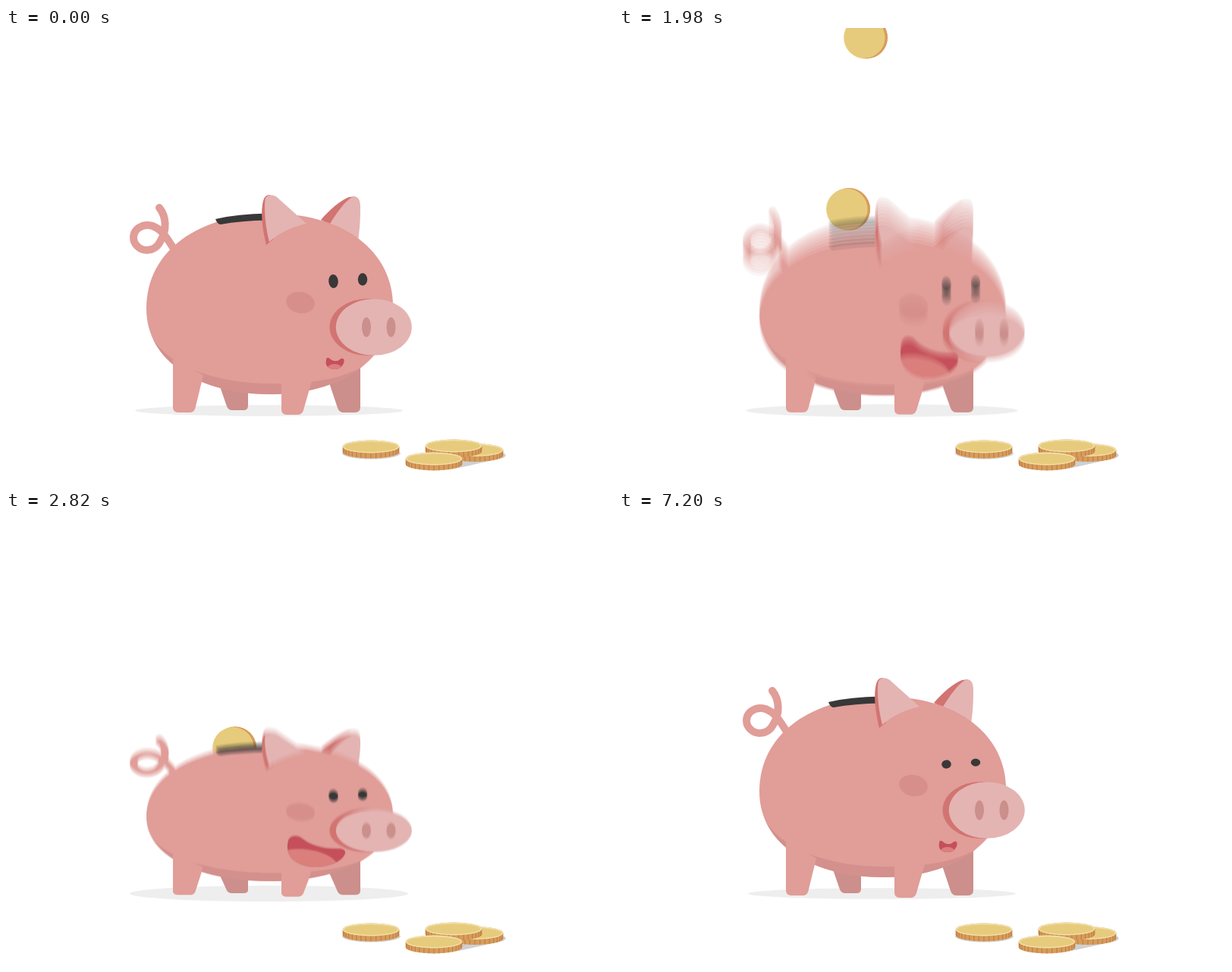
An HTML page with a canvas for the animation above (7230 ms loop, 800 by 600 pixels).

```html
<!DOCTYPE html>
<html lang="en">
<head>
<meta charset="utf-8">
<title>Piggy bank</title>
<style>
html, body { margin: 0; width: 100%; height: 100%; overflow: hidden; background: #fff; }
canvas { display: block; }
</style>
</head>
<body>
<canvas id="stage" width="800" height="600"></canvas>
<script>
const W = 800, H = 600, LOOP = 7230, STEP = 30, GROUND = 504;
const SHUTTER = 40, SAMPLES = 10;

const color = {
  skin: '#e19d98', shade: '#d3908c', farLeg: '#cc8f8b', pale: '#e4b4b2', deep: '#d27471',
  nostril: '#cb8f8c', cheek: '#d68f8b', ink: '#383838', mouth: '#c54f5a', tongue: '#db7f7d',
  gold: '#e7cb7c', rim: '#d89c5b', ridge: '#bf8044', glint: '#f3e2ae'
};

const body = new Path2D('M185 370C185 292 256 245 352 245C446 245 510 295 510 367C510 436 440 483 350 483C255 483 185 440 185 370Z');
const belly = new Path2D('M190 405C215 448 280 469 350 469C420 469 465 460 505 420V490H185Z');
const tail = new Path2D('M202 237C211 248 213 266 203 282C196 296 176 297 169 282C164 266 180 257 193 261C207 266 213 279 221 291');
const slot = new Path2D('M276 252Q305 245 345 244.500V253.500Q310 254 283 259Q279 259.500 276 252Z');
const nearLegs = [
  new Path2D('M220 435V500Q220 507 227 507H242Q248 507 249.500 501L260 458Z'),
  new Path2D('M363 462V503Q363 510 370 510H384Q390 510 392 504L404 462Z')
];
const farLegs = [
  new Path2D('M281 470L291 499Q293 504 298 504H313Q319 504 319 498V470Z'),
  new Path2D('M424 462L437 501Q439 507 445 507H460Q467 507 467 500V440Z')
];
const rearEar = {
  back: new Path2D('M415 253C428 238 440 228 452 223L460 222L432 262Z'),
  front: new Path2D('M427 258C435 245 446 229 456 223C463 220 467 226 467 236C467 255 466 267 464 280Z')
};
const frontEar = {
  back: new Path2D('M343 286C337 262 335 238 340 225C342 221 345 220 348 220L352 279Z'),
  front: new Path2D('M341.500 226C344 219 351 219 357 223L396 258C376 262 359 271 347 282C342 262 340 242 341.500 226Z')
};
// Start point followed by five cubic curves, matched so that one can turn into the other.
const smallMouth = [422, 438, 422, 434, 425, 434, 428, 437, 432, 440, 437, 440, 440, 437,
  444, 434, 447, 437, 445, 442, 443, 447, 439, 450, 433, 450, 426, 450, 420, 446, 422, 438];
const bigMouth = [372, 412, 374, 402, 385, 402, 390, 408, 402, 421, 420, 427, 436, 426,
  446, 425, 449, 431, 446, 437, 441, 450, 424, 458, 408, 458, 386, 458, 366, 442, 372, 412];

const squashKeys = [[0, 0], [700, 0], [930, .31], [1140, 0], [1490, 0], [1590, .3], [1690, 0],
  [1780, .3], [1930, 0], [1950, 0], [2050, .3], [2280, 0], [2430, 0], [2530, .3], [2640, 0],
  [2760, .28], [3030, 0], [LOOP, 0]];
const mouthKeys = [[0, 0], [1500, 0], [1680, 1], [3930, 1], [4110, 0], [LOOP, 0]];
const blinkStarts = [780, 4710, 6930];
const coinDrops = [[303, 1498], [327, 1684], [303, 1949], [326, 2452], [302, 2626]];
const sparkles = [[279.5, 165, 17, 15, '#cfcfcf'], [367, 221, 12, 0, '#efefef'], [346, 107, 8.5, 0, '#efc4b8']];

const mix = (a, b, u) => a + (b - a) * u;
const clamp = u => Math.max(0, Math.min(1, u));

function keyed(keys, t) {
  const i = keys.findIndex(k => k[0] > t);
  if (i < 1) return keys[0][1];
  const [t0, a] = keys[i - 1], [t1, b] = keys[i];
  return mix(a, b, (1 - Math.cos(Math.PI * (t - t0) / (t1 - t0))) / 2);
}

function eyeOpenness(t) {
  for (const start of blinkStarts) {
    const p = t - start + STEP;
    if (p > 0 && p < 330) return clamp(Math.max(1 - p / 130, (p - 200) / 160, .14));
  }
  return 1;
}

function layer() {
  const c = document.createElement('canvas');
  c.width = W; c.height = H;
  return c.getContext('2d');
}
const screen = document.getElementById('stage').getContext('2d');
const pig = layer(), scene = layer();

function fill(g, path, style) {
  g.fillStyle = style;
  g.fill(path);
}

function oval(g, x, y, rx, ry, style, turn = 0) {
  g.beginPath();
  g.ellipse(x, y, rx, ry, turn, 0, Math.PI * 2);
  g.fillStyle = style;
  g.fill();
}

function drawMouth(g, open) {
  const p = smallMouth.map((v, i) => mix(v, bigMouth[i], open));
  const path = new Path2D();
  path.moveTo(p[0], p[1]);
  for (let i = 2; i < p.length; i += 6) path.bezierCurveTo(...p.slice(i, i + 6));
  fill(g, path, color.mouth);
  g.save();
  g.clip(path);
  oval(g, mix(433, 394, open), mix(450, 453, open), mix(10, 44, open), mix(7, 26, open), color.tongue, .18 * open);
  g.restore();
}

function drawPig(t) {
  const g = pig;
  g.clearRect(0, 0, W, H);
  farLegs.forEach(p => fill(g, p, color.farLeg));
  g.lineWidth = 10;
  g.lineCap = 'round';
  g.strokeStyle = color.skin;
  g.stroke(tail);
  fill(g, rearEar.back, color.deep);
  fill(g, rearEar.front, color.pale);
  fill(g, body, color.skin);
  g.save();
  g.clip(body);
  fill(g, belly, color.shade);
  g.restore();
  nearLegs.forEach(p => fill(g, p, color.skin));
  fill(g, slot, color.ink);
  fill(g, frontEar.back, color.deep);
  fill(g, frontEar.front, color.pale);
  oval(g, 388, 362, 19, 14, color.cheek, .2);

  const open = eyeOpenness(t);
  oval(g, 431.5, 334, 6.3, 9 * open, color.ink, -.08 * open);
  oval(g, 470, 331.5, 6.2, 8.2 * open, color.ink);

  drawMouth(g, keyed(mouthKeys, t));
  g.save();
  g.clip(body);
  oval(g, 477, 394.5, 50.5, 37.5, color.deep);
  g.restore();
  oval(g, 484.8, 394.5, 50, 37.3, color.pale);
  oval(g, 475, 394.5, 6, 13, color.nostril);
  oval(g, 507.5, 394.5, 6, 13, color.nostril);
}

function flatCoin(g, x, y) {
  const rx = 37.3, ry = 8.5, depth = 7;
  const edge = new Path2D();
  edge.ellipse(x, y + depth, rx, ry, 0, 0, Math.PI);
  edge.lineTo(x - rx, y);
  edge.ellipse(x, y, rx, ry, 0, Math.PI, Math.PI * 2);
  edge.closePath();
  fill(g, edge, color.rim);
  g.save();
  g.clip(edge);
  g.fillStyle = color.ridge;
  for (let i = -8; i <= 8; i++) g.fillRect(x + rx * Math.sin(i * .18) - .6, y, 1.2, 20);
  g.restore();
  oval(g, x, y, rx, ry, color.glint);
  oval(g, x, y + .2, rx - 1.8, ry - 1.6, color.gold);
}

function groundCoins(g) {
  oval(g, 481.5, 561, 38.5, 7.5, '#d2d2d2');
  flatCoin(g, 481, 552);
  fill(g, new Path2D('M535 576L527 577Q550 585 597 580L655 567Q661 564 657 561Z'), '#cfcfd2');
  flatCoin(g, 618, 556.5);
  flatCoin(g, 590, 551);
  flatCoin(g, 564, 568);
}

function fallingCoins(g, t) {
  for (const [x, landing] of coinDrops) {
    const y = 225 - .45 * (landing - t);
    if (y < -40 || y > 380) continue;
    oval(g, x, y, 28, 28, color.rim);
    oval(g, x - 1.5, y + .7, 27.6, 27.6, color.glint);
    oval(g, x + .3, y, 27.6, 27.6, color.rim);
    oval(g, x - 2.6, y, 27.2, 27.2, color.gold);
  }
}

function sparkle(g, [x, y, size, degrees, style], t) {
  const grow = Math.sin(Math.PI * clamp((t - 1260) / 360));
  if (grow <= 0) return;
  g.save();
  g.translate(x, y);
  g.rotate(-degrees * Math.PI / 180);
  g.scale(size * grow, size * grow);
  fill(g, new Path2D('M0-1Q.18-.18 1 0Q.18.18 0 1Q-.18.18-1 0Q-.18-.18 0-1Z'), style);
  g.restore();
}

function drawScene(t, squash) {
  const g = scene, k = Math.min(1, squash / .25), tall = 1 - squash;
  g.fillStyle = '#fff';
  g.fillRect(0, 0, W, H);
  oval(g, 346.5, 504.5, 176.5 + 7 * k, 7.3 + 3.2 * k, '#eeeeee');
  sparkle(g, sparkles[0], t);
  sparkle(g, sparkles[1], t);
  fallingCoins(g, t);
  sparkle(g, sparkles[2], t);
  g.drawImage(pig.canvas, 0, GROUND * squash, W, H * tall);
  groundCoins(g);
}

function render(t) {
  drawPig(t);
  const moving = [-1, 0, 1].some(side => keyed(squashKeys, t + side * SHUTTER / 2) > .003);
  const count = moving ? SAMPLES : 1;
  // Weights of 1, 1/2, 1/3... give an even average: motion blur.
  for (let i = 0; i < count; i++) {
    const shift = moving ? ((i + .5) / count - .5) * SHUTTER : 0;
    drawScene(t, keyed(squashKeys, t + shift));
    screen.globalAlpha = 1 / (i + 1);
    screen.drawImage(scene.canvas, 0, 0);
  }
}

const begin = performance.now();
let shown = -1;
function tick() {
  const t = Math.floor((performance.now() - begin) % LOOP / STEP) * STEP;
  if (t !== shown) render(shown = t);
  requestAnimationFrame(tick);
}
tick();
</script>
</body>
</html>
```
